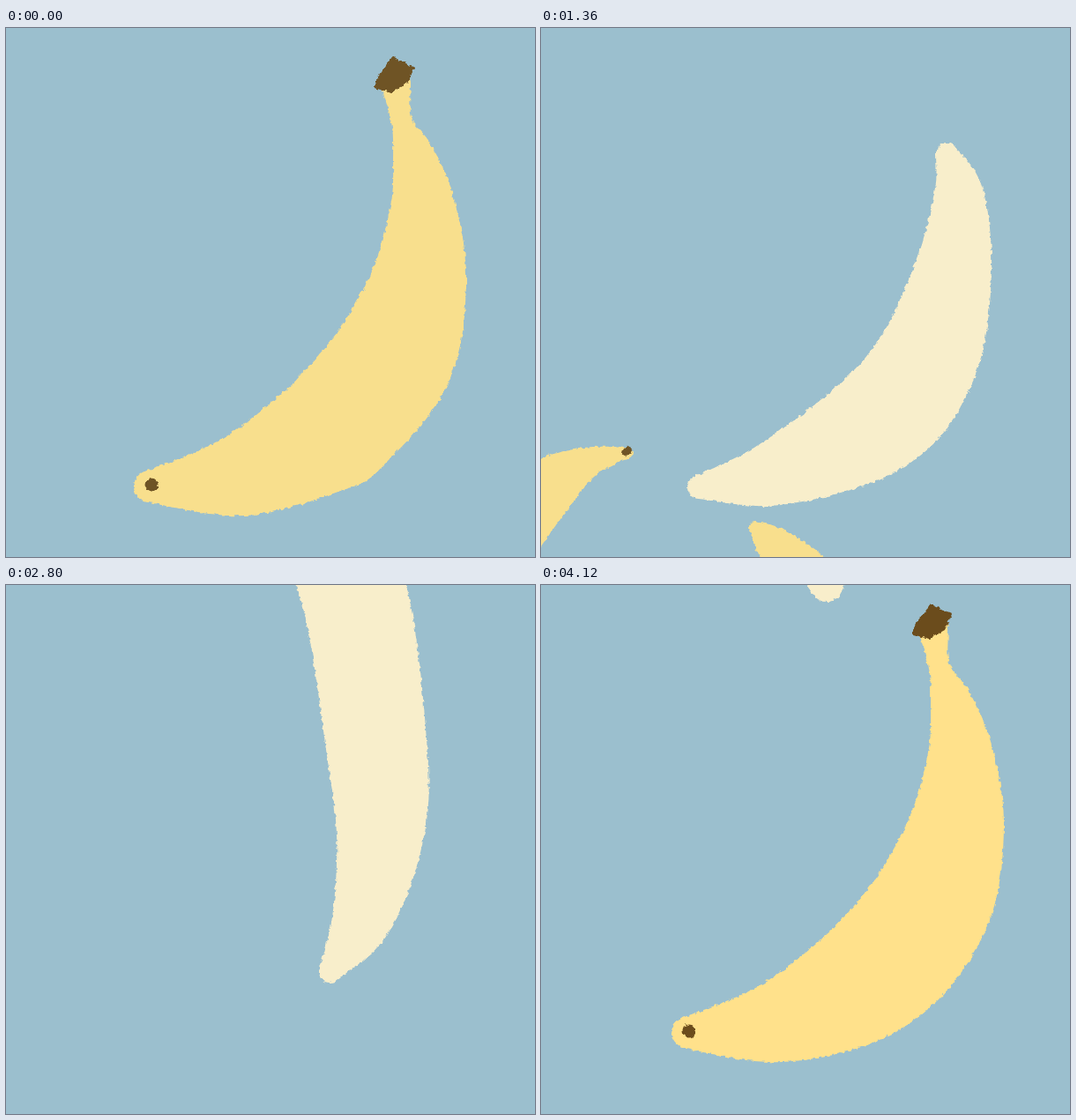
Write an HTML page that moves like this. It is 600 px wide and 600 px high and loops after 4.16 s.

```html
<!DOCTYPE html>
<html>
<head>
<meta charset="utf-8">
<style>
  html, body { margin: 0; width: 100%; height: 100%; overflow: hidden; background: #9bbfce; }
  svg { display: block; width: 100vw; height: 100vh; }
</style>
</head>
<body>
<svg viewBox="0 0 600 600">
  <defs>
    <filter id="rough" filterUnits="userSpaceOnUse" x="-20" y="-20" width="640" height="640" color-interpolation-filters="sRGB">
      <feTurbulence type="fractalNoise" baseFrequency=".2" numOctaves="2" seed="4"/>
      <feDisplacementMap in="SourceGraphic" scale="5" xChannelSelector="R" yChannelSelector="G"/>
    </filter>
    <path id="stem" d="M-24 6L-21 -5L-3 -29L21 -17L13 1L-5 11Z"/>
  </defs>
  <g filter="url(#rough)">
    <path id="fruit" fill="#f8eecb"/>
    <path id="crease" stroke="#f6dc83" stroke-width="3" stroke-linecap="round"/>
    <g id="peeled" fill="#6f5425">
      <path id="peel" fill="#f8df8d"/>
      <use id="tipLeft" href="#stem"/>
      <use id="tipRight" href="#stem"/>
      <circle id="spot" r="7.5"/>
    </g>
    <g id="fresh" fill="#6b4c1c">
      <path id="skin" fill="#ffe18b"/>
      <use href="#stem" transform="translate(442 62)"/>
      <circle cx="165" cy="518" r="7.5"/>
    </g>
  </g>
</svg>
<script>
const $ = id => document.getElementById(id);
const LOOP = 4160;

// Every part is a soft tube: a few spine points [x, y, radius].
const banana = [[163,520,18], [270,506,47], [372,455,69], [437,378,69], [468,288,54],
  [473,205,37], [463,147,24], [449,106,12], [442,62,17]];
const core = banana.slice(0, 3), shutFlap = banana.slice(3);
const leftOpen = [[410,395,56], [416,335,27], [405,295,25], [380,285,23], [345,306,19], [273,379,6]];
const rightOpen = [[448,400,54], [478,350,35], [513,303,21], [550,296,20], [574,345,13], [553,453,6]];
const leftFallen = [[-120,690,56], [-90,640,45], [-50,590,40], [0,528,35], [50,494,18], [98,482,6]];
const rightFallen = [[280,780,56], [310,730,45], [315,680,40], [300,628,34], [266,588,21], [243,567,7]];

const whole = [[179,521,13], [270,503,38], [380,447,60], [437,377,58], [467,278,44], [474,190,28], [460,142,12]];
const arched = [[281,516,12], [325,497,32], [372,415,59], [364,280,60], [443,260,56], [487,203,37], [502,127,12]];
const stretched = [[328,480,13], [380,440,40], [425,365,50], [452,270,52], [475,180,46], [490,100,30], [498,52,14]];
const climbing = [[367,439,12], [404,378,34], [424,285,49], [421,190,57], [392,0,60], [330,-120,55], [300,-200,20]];
const leaving = [[428,156,18], [424,130,30], [405,82,43], [362,30,57], [308,2,62], [280,-70,60], [270,-140,30]];

const shift = (pts, dx, dy) => pts.map(([x, y, r]) => [x + dx, y + dy, r]);
const fruitKeys = [[1360, whole], [1920, arched], [2240, stretched],
  [2800, climbing], [3600, leaving], [4120, shift(leaving, -104, -155)]];
const coreKeys = [[640, core], [1360, shift(core, -372, 325)]];
const leftKeys = [[0, shutFlap], [640, leftOpen], [1360, leftFallen]];
const rightKeys = [[0, shutFlap], [640, rightOpen], [1360, rightFallen]];
const leftTipSize = [[0, [[1]]], [640, [[.45]]], [1360, [[.3]]]];
const rightTipSize = [[0, [[1]]], [640, [[.35]]], [1360, [[0]]]];

const clamp = v => Math.min(1, Math.max(0, v));
const smooth = v => v * v * (3 - 2 * v);
const set = (id, name, value) => $(id).setAttribute(name, value);
const show = (id, on) => $(id).style.display = on ? "" : "none";

function pose(keys, t) {
  let i = 0;
  while (i < keys.length - 2 && t >= keys[i + 1][0]) i++;
  const [t0, a] = keys[i], [t1, b] = keys[i + 1];
  const p = clamp((t - t0) / (t1 - t0));
  return a.map((point, j) => point.map((v, k) => v + (b[j][k] - v) * p));
}

// Overlapping discs along a Catmull-Rom spine.
function tube(pts, steps = 24) {
  const at = i => pts[Math.min(pts.length - 1, Math.max(0, i))];
  let d = "";
  for (let n = 0; n <= (pts.length - 1) * steps; n++) {
    const i = Math.floor(n / steps), u = n / steps - i;
    const [a, b, c, e] = [at(i - 1), at(i), at(i + 1), at(i + 2)];
    const [x, y, r] = b.map((v, k) => v + u / 2 * (c[k] - a[k] +
      u * (2 * a[k] - 5 * v + 4 * c[k] - e[k] + u * (3 * (v - c[k]) + e[k] - a[k]))));
    d += `M${x - r} ${y}a${r} ${r} 0 1 0 ${2 * r} 0a${r} ${r} 0 1 0 ${-2 * r} 0`;
  }
  return d;
}

// Pushes a flap outwards, most at its tip.
const swing = (pts, dx, dy) =>
  pts.map(([x, y, r], i) => [x + dx * i / 5, y + dy * i / 5, r]);

function drawTip(id, flap, size) {
  const [x, y] = flap[5];
  set(id, "transform", `translate(${x} ${y}) scale(${size})`);
}

function drawPeel(t) {
  const p = t < 640 ? smooth(t / 640) * 640 : t;
  const arc = Math.sin(Math.PI * clamp(p / 640));
  const base = pose(coreKeys, p);
  const left = swing(pose(leftKeys, p), -20 * arc, -60 * arc);
  const right = swing(pose(rightKeys, p), 57 * arc, -86 * arc);
  set("peel", "d", tube(base) + tube([base[2], ...left]) + tube([base[2], ...right]));
  drawTip("tipLeft", left, pose(leftTipSize, p)[0][0]);
  drawTip("tipRight", right, pose(rightTipSize, p)[0][0]);
  set("spot", "cx", base[0][0] + 2);
  set("spot", "cy", base[0][1] - 2);
  const fall = Math.max(0, t - 1360) * .4;
  set("peeled", "transform", `translate(${-fall} ${fall})`);
}

function render(t) {
  const body = pose(fruitKeys, t);
  set("fruit", "d", tube(body));
  const [x, y] = body[3];
  set("crease", "d", `M${x + 44} ${y + 14}L${x + 58} ${y + 66}`);
  show("crease", Math.abs(t - 1920) <= 160);

  show("peeled", t < 1700);
  drawPeel(t);

  show("fresh", t >= 2960);
  const angle = (4120 - t) * 91.5 / 520;
  set("fresh", "transform", `rotate(${angle} 124 186) translate(3 -12)`);
}

set("skin", "d", tube(banana));

const start = performance.now();
function frame() {
  const t = (performance.now() - start) % LOOP;
  const step = t < 3360 ? 80 : 40;
  render(Math.floor(t / step) * step);
  requestAnimationFrame(frame);
}
frame();
</script>
</body>
</html>
```
